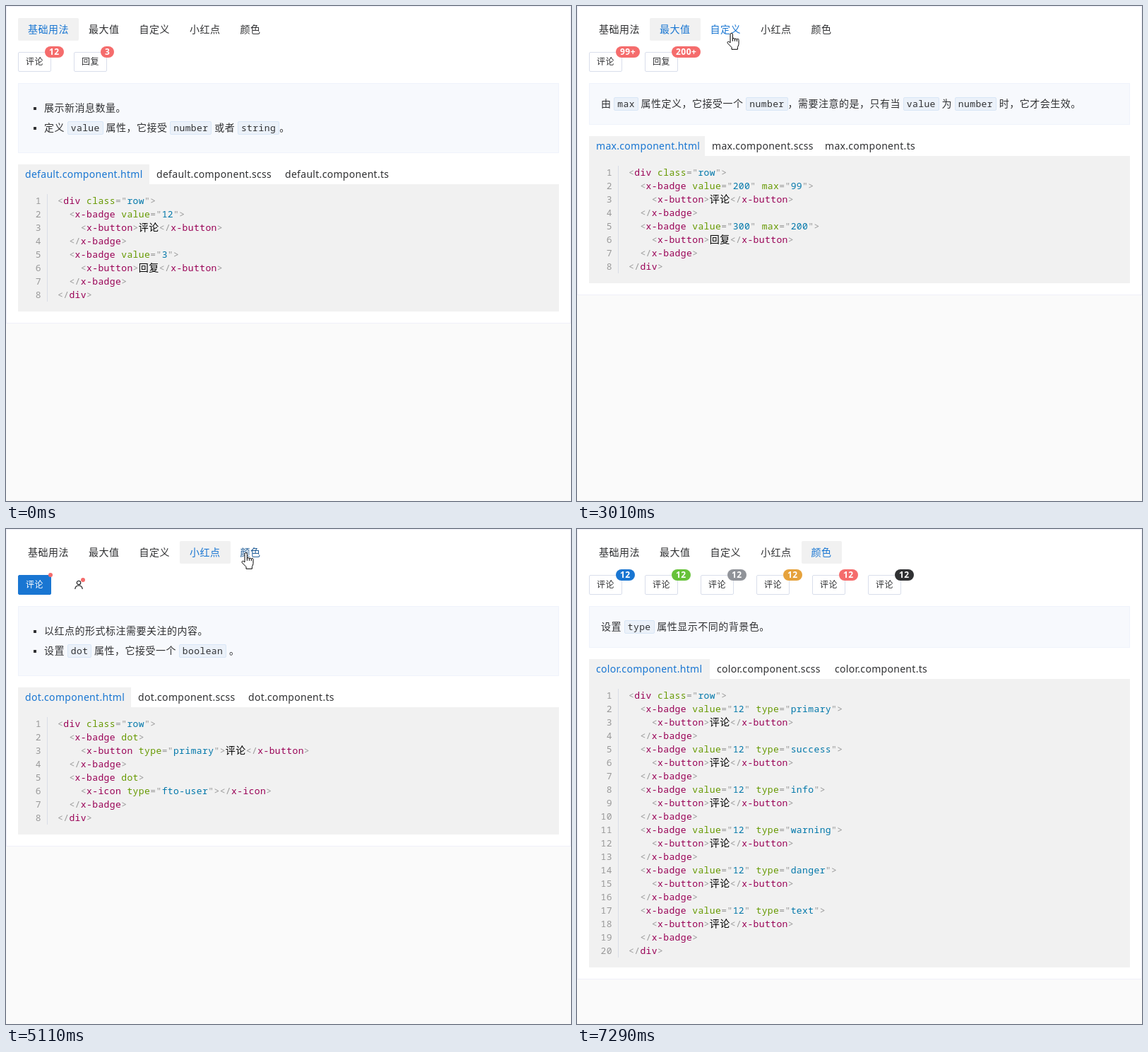
An HTML page that plays this animation: 800 by 700 pixels, repeating every 8220 ms.

```html
<!DOCTYPE html>
<html lang="zh-CN">
<head>
<meta charset="utf-8">
<title>Badge</title>
<style>
html, body { margin: 0; width: 100%; height: 100%; overflow: hidden; background: #fafafa; }
body {
  position: relative;
  color: #303133;
  font: 14px/28px "Noto Sans", "Noto Sans CJK SC", "Noto Sans CJK", sans-serif;
  letter-spacing: .5px;
}
.card {
  position: absolute; left: 0; top: 0; width: 800px; box-sizing: border-box;
  border: 1px solid #eff0f9; background: #fff; overflow: hidden; white-space: pre;
}
.nav { position: absolute; left: 16px; top: 16px; display: flex; }
.nav div { padding: 0 14px; line-height: 32px; border-radius: 2px; }
.panel { position: absolute; left: -1px; top: -1px; width: 800px; height: 700px; }
.panel > * { position: absolute; box-sizing: border-box; }
.btn {
  top: 65px; width: 47px; height: 28px; padding-left: 10px;
  border: 1px solid #d9deeb; border-radius: 2px; background: #fff;
  font-size: 12px; line-height: 26px;
}
.btn.primary { background: #1976d2; border-color: #1976d2; color: #fff; }
.badge {
  top: 57px; height: 16px; padding: 0 6px; border-radius: 8px;
  color: #fff; font-size: 12px; line-height: 16px; font-weight: 600;
}
.badge.word { letter-spacing: 0; }
.dot { width: 6px; height: 6px; border-radius: 50%; background: #f56c6c; }
.desc { left: 17px; width: 766px; background: #f7f9fd; border: 1px solid #eff3fb; top: 109px; }
.line { word-spacing: -.4px; }
.line.item::before {
  content: ""; position: absolute; left: -15px; top: 13px; width: 4px; height: 4px; background: #303133;
}
code, pre { font: 13px/19px "Noto Sans Mono", "Noto Sans CJK SC", "Noto Sans CJK", monospace; letter-spacing: .4px; }
code {
  display: inline-block; padding: 0 4px; line-height: 17px;
  border: 1px solid #d8e6f6; border-radius: 2px; background: #ebf1f9;
}
.file { letter-spacing: .3px; }
.file.on { left: 17px; padding-left: 10px; height: 28px; background: #f1f1f1; color: #1976d2; }
.box { left: 17px; width: 766px; background: #f1f1f1; }
pre { margin: 0; }
.src { left: 73px; color: #999; }
.nums { left: 17px; width: 42px; padding-right: 8px; border-right: 1px solid #d9dde6; text-align: right; color: #999; }
.tag { color: #905; }
.attr { color: #690; }
.val { color: #07a; }
.han { color: #000; font-size: 14px; line-height: 0; letter-spacing: .5px; }
.cursor { position: absolute; left: 0; top: 0; }
svg { position: absolute; left: 0; top: 0; overflow: visible; }
.hand { left: -6px; }
.cursor path { fill: #fff; stroke: #000; stroke-linejoin: round; stroke-linecap: round; }
</style>
</head>
<body>
<div class="card"><div class="nav"></div></div>
<div class="cursor">
  <svg class="arrow" width="12" height="20"><path d="M.5.5V16.5l3.8-3.5 2.5 5.8 2.4-1-2.5-5.7h4.8z"/></svg>
  <svg class="hand" width="18" height="24"><path d="M5 13.5V2.2a1.7 1.7 0 0 1 3.4 0V8.5a1.6 1.6 0 0 1 3 .4 1.6 1.6 0 0 1 2.9.6 1.4 1.4 0 0 1 2.7 1V15.5c0 2-1 3-1.6 5V23.3H7V20.5L1.4 14.8C.2 13 1.9 11.6 3.4 12.6Z"/><path d="M8.4 8.5v3M11.4 9v2.5M14.3 9.6v2.2"/></svg>
</div>
<script>
const LOOP = 8220, SLIDE = 300, BLUE = '#1976d2', DARK = '#303133', RED = '#f56c6c';
const START = [0, 1305, 3320, 4805, 6425];   // when each panel opens
const HOVER = [0, 200, 1470, 3600, 5010];    // when the pointer reaches its tab
const $ = s => document.querySelector(s);
const card = $('.card'), nav = $('.nav'), cursor = $('.cursor');
let rules = '', count = 0;

// stops: [ms, declarations, easing towards the next stop]
function animate(el, stops) {
  const all = [[0, ...stops[0].slice(1)], ...stops, [LOOP, stops[stops.length - 1][1]]];
  const name = 'k' + count++;
  const body = all.map(([t, css, ease = 'linear']) =>
    `${(t / LOOP * 100).toFixed(4)}%{${css};animation-timing-function:${ease}}`).join('');
  rules += `@keyframes ${name}{${body}}\n.${name}{animation:${name} ${LOOP}ms infinite}\n`;
  el.classList.add(name);
}
const hold = (el, stops) => animate(el, stops.map(([t, css]) => [t, css, 'step-end']));

function add(parent, tag, cls, style, html = '') {
  const el = document.createElement(tag);
  el.className = cls;
  el.style.cssText = style;
  el.innerHTML = html;
  parent.append(el);
  return el;
}

const span = (cls, text) => `<span class="${cls}">${text}</span>`;
const paint = src => src.replace(
  /<(\/?)([\w-]+)|="([^"]*)"|>|([\w-]+)|([\u4e00-\u9fff]+)/g,
  (all, slash, tag, val, attr, han) =>
    tag ? '&lt;' + slash + span('tag', tag) :
    val ? '="' + span('val', val) + '"' :
    attr ? span('attr', attr) :
    han ? span('han', han) : '&gt;');

const button = (text, attrs = '') => `<x-button${attrs}>${text}</x-button>`;
const markup = items => ['<div class="row">',
  ...items.flatMap(([attrs, inner]) => [`  <x-badge ${attrs}>`, `    ${inner}`, '  </x-badge>']),
  '</div>'];
const pair = (a, b) => [[a, button('评论')], [b, button('回复')]];
const colors = { primary: BLUE, success: '#67c23a', info: '#909399', warning: '#e6a23c', danger: RED, text: DARK };
const types = Object.keys(colors);

const panels = [
  { tab: '基础用法', name: 'default', width: 186,
    badges: [['评论', '12'], ['回复', '3']],
    desc: ['展示新消息数量。', '定义 `value` 属性，它接受 `number` 或者 `string`。'],
    code: pair('value="12"', 'value="3"') },
  { tab: '最大值', name: 'max', width: 164,
    badges: [['评论', '99+'], ['回复', '200+']],
    desc: ['由 `max` 属性定义，它接受一个 `number`，需要注意的是，只有当 `value` 为 `number` 时，它才会生效。'],
    code: pair('value="200" max="99"', 'value="300" max="200"') },
  { tab: '自定义', name: 'custom', width: 186,
    badges: [['评论', 'new'], ['回复', 'hot']],
    desc: ['可以显示数字以外的文本内容。', '定义 `value` 为 `string` 类型是时可以用于显示自定义文本。'],
    code: pair('value="new"', 'value="hot"') },
  { tab: '小红点', name: 'dot', width: 160, badges: [],
    desc: ['以红点的形式标注需要关注的内容。', '设置 `dot` 属性，它接受一个 `boolean` 。'],
    code: [['dot', button('评论', ' type="primary"')], ['dot', '<x-icon type="fto-user"></x-icon>']] },
  { tab: '颜色', name: 'color', width: 171,
    badges: types.map(t => ['评论', '12', colors[t]]),
    desc: ['设置 `type` 属性显示不同的背景色。'],
    code: types.map(t => [`value="12" type="${t}"`, button('评论')]) }
];

function drawDots(root) {
  add(root, 'div', 'btn primary', 'left:17px', '评论');
  add(root, 'div', '', 'left:96px;top:72px',
    `<svg width="14" height="14" fill="none" stroke="${DARK}" stroke-width="1.3"><circle cx="7" cy="4" r="2.7"/><path d="M1.8 13a5.2 5.2 0 0 1 10.4 0"/></svg>`);
  add(root, 'div', 'dot', 'left:60px;top:62px');
  add(root, 'div', 'dot', 'left:106px;top:69px');
}

function drawPanel(p) {
  const root = add(card, 'div', 'panel', '');
  p.badges.forEach(([text, value, color = RED], i) => {
    const x = 17 + 79 * i;
    add(root, 'div', 'btn', `left:${x}px`, text);
    add(root, 'div', /[a-z]/.test(value) ? 'badge word' : 'badge', `left:${x + 38}px;background:${color}`, value);
  });
  if (p.name === 'dot') drawDots(root);

  const list = p.desc.length > 1;
  const top = list ? 224 : 184;
  add(root, 'div', 'desc', `height:${top - 125}px`);
  p.desc.forEach((text, i) => add(root, 'div', list ? 'line item' : 'line',
    list ? `left:54px;top:${130 + 28 * i}px` : 'left:34px;top:124px',
    text.replace(/`(\w+)`/g, '<code>$1</code>')));

  const file = p.name + '.component.';
  const x = 27 + p.width;
  add(root, 'div', 'file on', `top:${top}px;width:${p.width}px`, file + 'html');
  add(root, 'div', 'file', `top:${top}px;left:${x}px`, file + 'scss');
  add(root, 'div', 'file', `top:${top}px;left:${x + p.width - 4}px`, file + 'ts');

  const lines = markup(p.code), high = lines.length * 19;
  add(root, 'div', 'box', `top:${top + 28}px;height:${high + 28}px`);
  add(root, 'pre', 'nums', `top:${top + 42}px;height:${high}px`, lines.map((_, i) => i + 1).join('\n'));
  add(root, 'pre', 'src', `top:${top + 42}px`, lines.map(paint).join('\n'));
  p.height = top + high + 73;
  return root;
}

panels.forEach((p, i) => {
  const on = START[i], off = START[i + 1];
  const root = drawPanel(p);
  const away = 'opacity:0;transform:translateX(766px)', here = 'opacity:1;transform:translateX(0)';
  const show = i ? [[0, away], [on, away, 'ease'], [on + SLIDE, here, 'step-end']] : [[0, here, 'step-end']];
  if (off) show.push([off, away]);
  animate(root, show);

  const tab = add(nav, 'div', '', '');
  const label = add(tab, 'span', '', '', p.tab);
  const dark = 'color:' + DARK, blue = 'color:' + BLUE;
  const tint = i ? [[0, dark], [HOVER[i], dark], [HOVER[i] + 160, blue]] : [[0, blue]];
  const fill = [[0, 'background:transparent'], [on, 'background:#f1f1f1']].slice(i ? 0 : 1);
  if (off) {
    tint.push([off, blue], [off + 150, dark]);
    fill.push([off, 'background:transparent']);
  }
  animate(label, tint);
  hold(tab, fill);
});
hold(card, panels.map((p, i) => [START[i], `height:${p.height}px`]));

// pointer tip: ms, x, y
const path = [
  [150, 144, 12], [310, 141, 30], [470, 139, 35], [720, 139, 35], [860, 143, 33],
  [1310, 143, 33], [1470, 216, 38], [1620, 218, 38], [3480, 218, 38], [3790, 282, 31],
  [4860, 282, 31], [5100, 339, 33], [5440, 339, 33], [5500, 341, 33],
  [6430, 341, 33], [6590, 391, 133], [7230, 740, 685]
];
animate(cursor, path.map(([t, x, y]) => [t, `transform:translate(${x}px,${y}px)`]));
const off = 'opacity:0', on = 'opacity:1';
hold($('.arrow'), [[0, off], [150, on], [230, off], [6460, on], [7290, off]]);
hold($('.hand'), [[0, off], [230, on], [6460, off]]);

add(document.head, 'style', '', '', '').textContent = rules;
</script>
</body>
</html>
```
